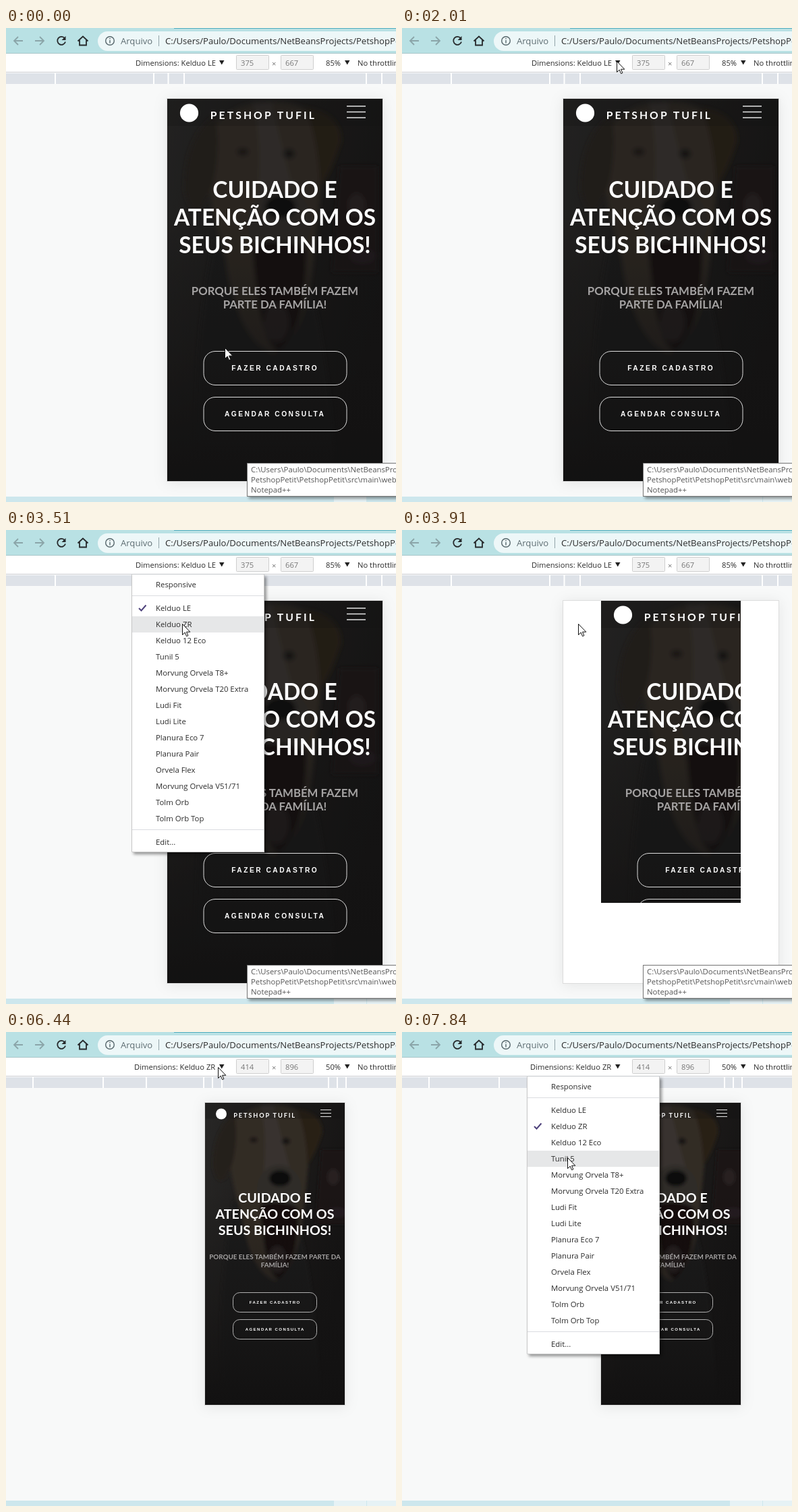
An HTML page for the animation above (8 s loop, 578 by 703 pixels).

```html
<!DOCTYPE html>
<html lang="pt">
<head>
<meta charset="utf-8">
<title>Responsive preview</title>
<style>
  html, body { margin: 0; width: 100%; height: 100%; overflow: hidden; background: #f8f9f9; }
  svg { display: block; }
  text { white-space: pre; }
  .ui { font: 11.35px "Open Sans", "Noto Sans", sans-serif; fill: #2b2b2b; }
  .bar { font-size: 11.2px; }
  .url { font-size: 13.1px; }
  .lato { font-family: Lato, sans-serif; font-weight: 700; fill: #fff; }
  .btn { font-family: "Liberation Sans", Arial, sans-serif; font-weight: 700; fill: #fff; }
  .mid { text-anchor: middle; }
  .soft { filter: drop-shadow(0 2px 10px rgba(0, 0, 0, .08)); }
  .pop { filter: drop-shadow(3px 3px 2px rgba(0, 0, 0, .4)); }
</style>
</head>
<body>
<svg id="stage" width="578" height="703" viewBox="0 0 578 703">
  <defs>
    <linearGradient id="base" x1="0" y1="0" x2="1" y2=".5">
      <stop offset="0" stop-color="#2a2928"/><stop offset=".55" stop-color="#1e1c1b"/><stop offset="1" stop-color="#151414"/>
    </linearGradient>
    <linearGradient id="fade" x1="0" y1="0" x2="0" y2="1">
      <stop offset=".3" stop-color="#141313" stop-opacity="0"/><stop offset=".68" stop-color="#151414" stop-opacity=".5"/>
      <stop offset="1" stop-color="#131212"/>
    </linearGradient>
    <filter id="blur" x="-20%" y="-20%" width="140%" height="140%"><feGaussianBlur stdDeviation="2.5"/></filter>
    <g id="dog" filter="url(#blur)">
      <path d="M172 70h40v110h-48z" fill="#1a1617"/>
      <ellipse cx="190" cy="110" rx="9" ry="12" fill="#2a2424"/>
      <ellipse cx="196" cy="163" rx="14" ry="8" fill="#281f20"/>
      <path d="M42 145Q14 280 28 452H172Q164 260 138 180Z" fill="#1e1c1b"/>
      <path d="M34 40Q55 2 105 3Q152 5 157 42Q152 110 146 160Q138 250 104 264Q66 250 54 165Q32 95 34 40Z" fill="#352d26"/>
      <path d="M44 16Q11 40 12 95Q17 122 30 112Q46 88 46 42Z" fill="#28201a"/>
      <path d="M136 9Q174 14 174 44Q164 76 152 92Q150 40 136 9Z" fill="#292019"/>
      <path d="M82 4Q93 45 86 112H130Q112 50 102 3Z" fill="#3b3631"/>
      <ellipse cx="110" cy="128" rx="33" ry="36" fill="#332f2b"/>
      <ellipse cx="72" cy="55" rx="6" ry="4" fill="#1b1614"/>
      <ellipse cx="120" cy="57" rx="6" ry="5" fill="#171312"/>
      <ellipse cx="111" cy="112" rx="16" ry="12" fill="#0e0d0d"/>
      <path d="M82 152Q110 142 138 156Q138 245 108 262Q88 250 82 152Z" fill="#131111"/>
      <ellipse cx="107" cy="232" rx="13" ry="20" fill="#2a2122"/>
    </g>
  </defs>

  <!-- browser bar -->
  <rect width="578" height="38" fill="#b9e1e4"/>
  <path d="M0 37.500H578" stroke="#a8c6c9"/>
  <rect x="249" width="329" height="1" fill="#55aebf"/>
  <rect x="136" y="5" width="480" height="29" rx="14.5" fill="#edf7f8"/>
  <g fill="none" stroke-width="1.8">
    <path d="M25 19H12M18 13l-6 6 6 6M43 19h13M50 13l6 6-6 6" stroke="#8ba5a9"/>
    <path d="M87 15.2A6 6 0 1 0 88 20.5" stroke="#26292b"/>
    <path d="M106.500 19.500l7.500-7 7.500 7M109 18v7.500h10V18" stroke="#26292b"/>
    <g stroke="#56666b" stroke-width="1.4"><circle cx="154" cy="19" r="6.300"/><path d="M154 18v4.500M154 15v1.500"/></g>
  </g>
  <path d="M88.500 12v6h-6z" fill="#26292b"/>
  <text class="ui url" x="170" y="24" style="fill:#5e6d72">Arquivo</text>
  <path d="M226.500 11v16" stroke="#93a4a8"/>
  <text class="ui url" x="236" y="24">C:/Users/Paulo/Documents/NetBeansProjects/PetshopPetit</text>

  <!-- device bar -->
  <rect y="38" width="578" height="28" fill="#fff"/>
  <path d="M0 65.500H578" stroke="#c9ccd0"/>
  <g fill="#f3f3f3" stroke="#cfcfcf"><rect x="341.500" y="40.500" width="48" height="21" rx="1"/><rect x="407.500" y="40.500" width="48" height="21" rx="1"/></g>
  <g class="ui bar">
    <text id="device" y="55.500"></text>
    <text id="wide" x="348" y="55.500" fill="#777"></text>
    <text x="394" y="57" fill="#777">×</text>
    <text id="tall" x="414" y="55.500" fill="#777"></text>
    <text id="zoom" x="474" y="55.500"></text>
    <text x="521" y="55.500">No throttling</text>
  </g>
  <path d="M316 48h7.500l-3.750 6.500zM502 48h7.500l-3.750 6.500z" fill="#222"/>
  <rect y="66" width="578" height="17" fill="#fff"/>
  <rect y="67" width="578" height="16" fill="#dee2e8"/>
  <path id="ticks" stroke="#fff" stroke-width="2"/>

  <!-- pages -->
  <rect id="frame" class="soft" y="104.500" fill="#fff" stroke="#dcdcdc"/>
  <svg id="small" y="105"></svg>
  <svg id="large" x="295" y="105" width="207" height="448"></svg>

  <!-- task bar and hint -->
  <rect y="695" width="578" height="8" fill="#cde7ed"/>
  <rect x="486" y="695" width="48" height="8" fill="#e6f2f5"/>
  <rect id="task" x="535" y="695" width="43" height="8" fill="#e6f2f5"/>
  <g id="hint">
    <rect class="pop" x="357.500" y="645.500" width="240" height="49" fill="#fff" stroke="#767676"/>
    <g class="ui" style="fill:#555">
      <text x="363" y="659">C:\Users\Paulo\Documents\NetBeansProjects\</text>
      <text x="363" y="674">PetshopPetit\PetshopPetit\src\main\webapp</text>
      <text x="363" y="689">Notepad++</text>
    </g>
  </g>

  <g id="menu"></g>
  <path id="arrow" d="M.5.500V16.500L4.200 13 6.600 18.600 8.900 17.600 6.500 12.200H11.800Z" fill="#fff" stroke="#111"/>
</svg>

<script>
const $ = id => document.getElementById(id);
const set = (el, attrs) => { for (const k in attrs) el.setAttribute(k, attrs[k]); };
const show = (el, on) => el.style.display = on ? '' : 'none';

const LOOP = 8000;
const DEVICES = [
  { name: 'Kelduo LE', x: 192, wide: 375, tall: 667, zoom: '85%', ticks: [73, 219, 240.5, 264, 534, 557], menu: 186, check: 116 },
  { name: 'Kelduo ZR', x: 190, wide: 414, tall: 896, zoom: '50%', ticks: [40, 144, 208, 293, 306, 320, 478, 491, 504], menu: 185, check: 140 }
];
const ITEMS = ['Kelduo LE', 'Kelduo ZR', 'Kelduo 12 Eco', 'Tunil 5', 'Morvung Orvela T8+', 'Morvung Orvela T20 Extra',
  'Ludi Fit', 'Ludi Lite', 'Planura Eco 7', 'Planura Pair', 'Orvela Flex', 'Morvung Orvela V51/71', 'Tolm Orb', 'Tolm Orb Top'];
const ROWS = [['Responsive', 81], ...ITEMS.map((name, i) => [name, 116 + 24 * i]), ['Edit...', 463]];

// start, end, number of steps, then the points passed
const MOVES = [
  [70, 70, 1, [324, 474], [285, 328]],
  [340, 340, 1, [285, 328], [257, 264]],
  [550, 1290, 11, [257, 264], [205, 150], [178, 80], [215, 56], [305, 51]],
  [1360, 1530, 3, [305, 51], [315, 50]],
  [1670, 1730, 2, [315, 50], [318, 49]],
  [2770, 2910, 3, [318, 49], [308, 75], [297, 98], [284, 113]],
  [2990, 3510, 7, [284, 113], [272, 135], [261, 139]],
  [3960, 4420, 7, [261, 139], [290, 95], [310, 58]],
  [4480, 4610, 3, [310, 58], [317, 49]],
  [4830, 4830, 1, [317, 49], [317, 48]],
  [5980, 5980, 1, [317, 48], [318, 47]],
  [6230, 6440, 4, [318, 47], [311, 42], [305, 38], [309, 46], [314, 52]],
  [7150, 7840, 11, [314, 52], [278, 112], [251, 172], [245, 186]]
];

function cursorAt(t) {
  let pos = MOVES[0][3];
  for (const [from, to, n, ...pts] of MOVES) {
    if (t < from) break;
    const step = to > from ? Math.min(n, Math.floor((t - from) / (to - from) * (n - 1) + 1e-6) + 1) : 1;
    const p = step / n * (pts.length - 1);
    const i = Math.min(pts.length - 2, Math.floor(p));
    pos = pts[i].map((v, k) => v + (pts[i + 1][k] - v) * (p - i));
  }
  return pos;
}

const label = (cls, x, y, size, text, extra = '') =>
  `<text class="${cls}" x="${x}" y="${y}" font-size="${size}" ${extra}>${text}</text>`;

function page(o) {
  const k = o.scale, c = o.w / 2;
  const head = ['CUIDADO E', 'ATENÇÃO COM OS', 'SEUS BICHINHOS!'];
  const bars = [-1, 0, 1].map(i => `M${o.bars[0]} ${o.bars[1] + i * o.bars[3]}h${o.bars[2]}`).join('');
  return `<rect width="${o.w}" height="${o.h}" fill="url(#base)"/>
    <use href="#dog" transform="${o.dog}"/>
    <rect width="${o.w}" height="${o.h}" fill="url(#fade)"/>
    <rect width="${o.w}" height="${o.h}" fill="#121111" opacity="${o.dim}"/>
    <rect width="${o.w}" height="${47 * k}" fill="#111" opacity=".25"/>
    <circle cx="${o.logo[0]}" cy="${o.logo[1]}" r="${16 * k}" fill="#fff"/>
    ${label('lato', o.brand[0], o.brand[1], 18.5 * k, 'PETSHOP TUFIL', `letter-spacing="${3.65 * k}"`)}
    <path d="${bars}" stroke="#e4e4e4" stroke-width="${2 * k}"/>
    ${head.map((s, i) => label('lato mid', c, o.head + 48 * k * i, 39.3 * k, s)).join('')}
    ${o.sub.map((s, i) => label('lato mid', c, o.subY + 24 * k * i, 19.7 * k, s, 'style="fill:#a5a3a3"')).join('')}
    ${['FAZER CADASTRO', 'AGENDAR CONSULTA'].map((s, i) => {
      const y = o.btn[1] + i * o.btn[4];
      return `<rect x="${o.btn[0]}" y="${y}" width="${o.btn[2]}" height="${o.btn[3]}" rx="${20 * k}" fill="none" stroke="#fff" stroke-opacity="${o.line}"/>` +
        label('btn mid', c + .2, y + o.btn[3] / 2 + 4.2 * k, 12 * k, s, `letter-spacing="${2.95 * k}"`);
    }).join('')}`;
}

$('small').innerHTML = page({
  w: 319, h: 567, scale: .85, dog: 'translate(9) scale(1.43)', dim: .3, logo: [32.5, 21], brand: [63.7, 30],
  bars: [266, 19.5, 28, 8.5], head: 147, subY: 291, sub: ['PORQUE ELES TAMBÉM FAZEM', 'PARTE DA FAMÍLIA!'],
  btn: [54, 374.5, 212, 50, 68], line: .85
});
$('large').innerHTML = page({
  w: 207, h: 448, scale: .5, dog: '', dim: .05, logo: [24, 16.5], brand: [42.3, 22.2],
  bars: [171, 15.5, 16, 5], head: 148, subY: 232, sub: ['PORQUE ELES TAMBÉM FAZEM PARTE DA', 'FAMÍLIA!'],
  btn: [41.5, 281.5, 124, 29, 40], line: .65
});
$('menu').innerHTML = `<rect class="pop" y="66" width="197" height="412" fill="#fff"/>
  <path d="M.5 66V477.5H196.500V66" fill="none" stroke="#c8c8c8"/>
  <rect id="hover" x="1" width="195" height="24" fill="#e6e7e8"/>
  <path d="M1 97.500H196M1 444.500H196" stroke="#dadce0"/>
  <path id="check" d="M11 0l3.500 3.500 7-8" fill="none" stroke="#4f437c" stroke-width="2"/>
  ${ROWS.map(([s, y]) => `<text class="ui" x="36" y="${y + 4}">${s}</text>`).join('')}`;

const stepped = (t, from, len, n) => Math.max(0, Math.min(1, (Math.floor((t - from) / len * (n - 1)) + 1) / n));
function menuAlpha(t) {
  if (t >= 6740) return stepped(t, 6740, 160, 3);
  if (t >= 3670) return 1 - stepped(t, 3670, 150, 3);
  return t >= 2250 ? stepped(t, 2250, 200, 4) : 0;
}

function draw(t) {
  const switched = t >= 3960, resizing = t >= 3910, ready = t >= 5040;
  const d = DEVICES[+switched];
  $('device').textContent = 'Dimensions: ' + d.name;
  set($('device'), { x: d.x });
  for (const key of ['wide', 'tall', 'zoom']) $(key).textContent = d[key];
  set($('ticks'), { d: d.ticks.map(x => `M${x} 67v16`).join('') });

  set($('frame'), switched ? { x: 294.5, width: 208, height: 449 } : { x: 238.5, width: 320, height: 568 });
  set($('small'), resizing ? { x: 295, width: 207, height: 448 } : { x: 239, width: 319, height: 567 });
  show($('small'), !ready);
  show($('large'), ready);
  show($('task'), t >= 2010);
  show($('hint'), t < 4110);

  const alpha = menuAlpha(t);
  show($('menu'), alpha > 0);
  set($('menu'), { opacity: alpha, transform: `translate(${d.menu})` });
  set($('check'), { transform: `translate(0 ${d.check})` });
  const y = cursorAt(t - 60)[1];
  const row = ROWS.find(r => Math.abs(y - r[1]) < 12);
  show($('hover'), row);
  if (row) set($('hover'), { y: row[1] - 12 });

  const [cx, cy] = cursorAt(t);
  set($('arrow'), { transform: `translate(${Math.round(cx)} ${Math.round(cy)})` });
}

const begin = performance.now();
function tick() {
  draw((performance.now() - begin) % LOOP);
  requestAnimationFrame(tick);
}
tick();
</script>
</body>
</html>
```
